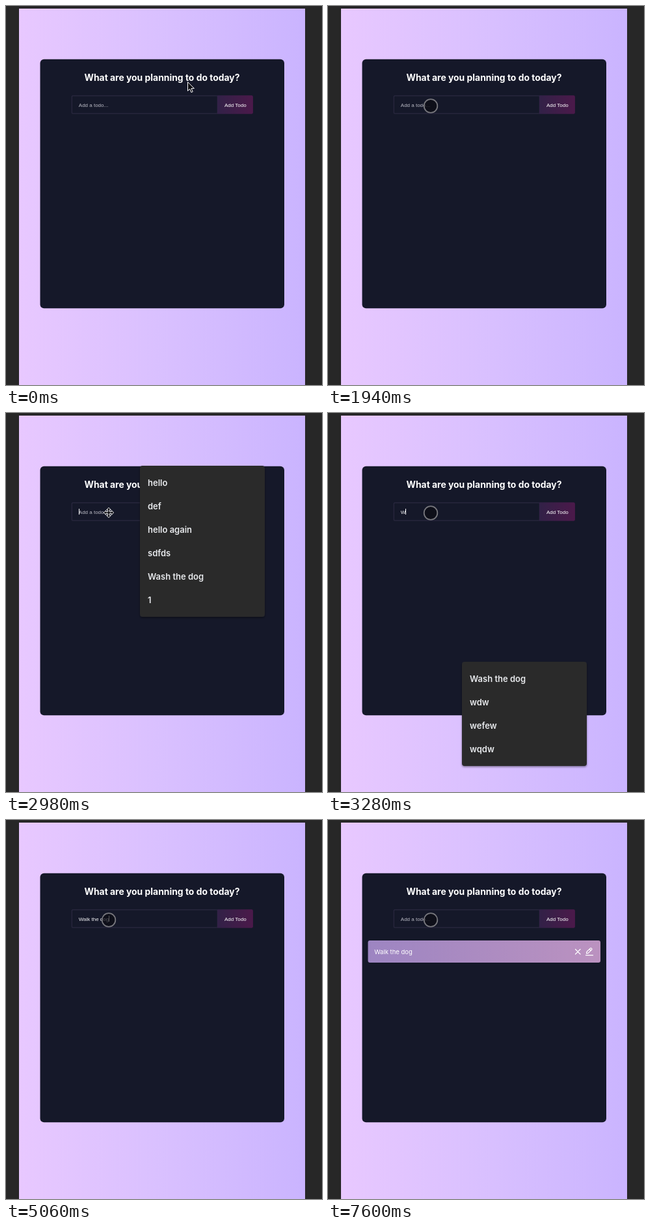
Recreate the animation shown at these times as an HTML page. Size 486 px wide and 582 px high, loop 8 s.

```html
<!DOCTYPE html>
<html lang="en">
<head>
<meta charset="utf-8">
<title>Todo list</title>
<style>
  html, body { margin: 0; width: 100%; height: 100%; overflow: hidden; background: #272727; }
  svg { display: block; width: 486px; height: 582px; }
  text { white-space: pre; fill: #fff; }
  .ui { font-family: Inter, "Open Sans", sans-serif; }
  .field { font: 8px "Liberation Sans", Arial, sans-serif; }
  .title { font-size: 13.9px; font-weight: 700; }
  .option { font-size: 13px; font-weight: 600; fill: #e8eaed; }
  .entry { font-size: 9.5px; }
  .line { fill: none; stroke: #fff; stroke-linecap: round; stroke-linejoin: round; }
</style>
</head>
<body>
<svg viewBox="0 0 486 582">
  <defs>
    <linearGradient id="page">
      <stop offset="0" stop-color="#e8c8ff"/>
      <stop offset=".5" stop-color="#d9c0ff"/>
      <stop offset="1" stop-color="#cab4ff"/>
    </linearGradient>
    <linearGradient id="button">
      <stop offset="0" stop-color="#322147"/>
      <stop offset="1" stop-color="#4b194a"/>
    </linearGradient>
    <linearGradient id="entryFill">
      <stop offset="0" stop-color="#9d85c2"/>
      <stop offset="1" stop-color="#bb92c0"/>
    </linearGradient>
    <filter id="shadow" x="-10%" y="-10%" width="120%" height="125%">
      <feDropShadow dx="0" dy="1.5" stdDeviation="1.5" flood-opacity=".45"/>
    </filter>
  </defs>

  <rect width="486" height="582" fill="#272727"/>
  <rect x="20" y="4" width="440" height="578" fill="url(#page)"/>
  <rect x="52.5" y="81.7" width="375.5" height="382.6" rx="6" fill="#151829"/>
  <text class="ui title" x="240" y="115" text-anchor="middle">What are you planning to do today?</text>

  <rect x="101.3" y="137.8" width="224" height="27.4" rx="1.5" fill="none" stroke="#2b2940" stroke-width="1.2"/>
  <path d="M325 137.3h52.5a2.4 2.4 0 0 1 2.4 2.4v23.7a2.4 2.4 0 0 1-2.4 2.4H325z" fill="url(#button)"/>
  <text class="field" x="352.8" y="154.6" text-anchor="middle">Add Todo</text>
  <text class="field" id="value" x="111.8" y="154.6"></text>
  <rect id="caret" y="147" width="1" height="9" fill="#fff"/>

  <g id="entry">
    <rect x="61.5" y="185" width="357.5" height="34" rx="3" fill="url(#entryFill)"/>
    <text class="ui entry" x="71.2" y="206">Walk the dog</text>
    <path class="line" stroke-width="1.2" d="M380.5 198.500l7.500 7.500m0-7.500l-7.500 7.500"/>
    <path class="line" stroke-width="1.200" d="M396.500 207.700h11M397.500 205l.5-2.800 5.500-5.300q.7-.6 1.400 0l.8.8q.6.7 0 1.400l-5.500 5.300zM402.200 198.300l2.200 2.200"/>
  </g>

  <g id="popup">
    <rect id="popupBox" x="206" width="192" rx="4" fill="#292a2c" filter="url(#shadow)"/>
    <g id="options"></g>
  </g>

  <g id="cursor">
    <path id="arrow" d="M.5.7V14.400l3.200-3 2.200 5.200 2.300-1-2.200-5h4.400z" fill="#0b0b10" stroke="#fff" stroke-linejoin="round"/>
    <path id="move" d="M0-7.700L3.300-4.200H1.300V-1.300H4.200V-3.300L7.700 0 4.200 3.300V1.300H1.300V4.200H3.300L0 7.700-3.300 4.200H-1.300V1.300H-4.200V3.300L-7.700 0-4.200-3.300V-1.300H-1.300V-4.200H-3.300z" fill="#0b0b10" stroke="#fff" stroke-linejoin="round"/>
    <circle id="ring" cy=".5" r="10.300" fill="#0b0b12" fill-opacity=".7" stroke="#77777d" stroke-width="1.800"/>
  </g>
</svg>
<script>
const LOOP = 8000;
const PLACEHOLDER = 'Add a todo...';
const $ = id => document.getElementById(id);

// Each track holds [start ms, ...values]; a value stays until the next start.
const typing = [
  [0, ''], [3280, 'W'], [3430, 'Wa'], [3870, 'Wal'], [4020, 'Walk'],
  [4170, 'Walk '], [4320, 'Walk t'], [4470, 'Walk th'], [4620, 'Walk the'],
  [4770, 'Walk the d'], [4920, 'Walk the do'], [5060, 'Walk the dog'], [5660, '']
];
const caretOn = [
  [0, false], [2090, true], [2540, false], [2980, true],
  [5660, false], [6110, true], [6550, false], [7150, true], [7600, false]
];
const pointer = [
  [0, 'arrow', 279, 116], [150, 'arrow', 273, 128], [300, 'move', 266, 147],
  [450, 'move', 261, 159], [600, 'move', 259, 163],
  [1500, 'move', 238, 161], [1640, 'move', 190, 156], [1790, 'move', 158, 153],
  [1940, 'ring', 158, 153], [2980, 'move', 158, 153], [3280, 'ring', 158, 153]
];
const suggestions = [
  [0, 0, []],
  [2090, 81, ['hello', 'def', 'hello again', 'sdfds', 'Wash the dog', '1']],
  [3280, 382, ['Wash the dog', 'wdw', 'wefew', 'wqdw']],
  [3430, 382, ['Wash the dog']],
  [3870, 0, []]
];

const at = (track, t) => track.findLast(step => step[0] <= t);
const show = (id, on) => $(id).setAttribute('visibility', on ? 'visible' : 'hidden');

function drawField(t) {
  const text = at(typing, t)[1];
  const value = $('value');
  value.textContent = text || PLACEHOLDER;
  value.style.fill = text ? '#f2f2f5' : '#b9b9c3';
  const width = text ? value.getComputedTextLength() : 0;
  $('caret').setAttribute('x', Math.round(111.6 + width));
  show('caret', at(caretOn, t)[1]);
}

let shownList;
function drawPopup(t) {
  const [, top, list] = at(suggestions, t);
  if (list === shownList) return;
  shownList = list;
  show('popup', list.length > 0);
  $('popupBox').setAttribute('y', top);
  $('popupBox').setAttribute('height', list.length * 36 + 16);
  $('options').innerHTML = list.map((label, i) =>
    `<text class="ui option" x="218" y="${top + 31 + i * 36}">${label}</text>`).join('');
}

function drawPointer(t) {
  const [, shape, x, y] = at(pointer, t);
  for (const id of ['arrow', 'move', 'ring']) show(id, id === shape);
  $('cursor').setAttribute('transform', `translate(${x} ${y})`);
}

function render(t) {
  drawField(t);
  drawPopup(t);
  drawPointer(t);
  show('entry', t >= 5660);
}

const start = performance.now();
function tick() {
  render((performance.now() - start) % LOOP);
  requestAnimationFrame(tick);
}
tick();
</script>
</body>
</html>
```
